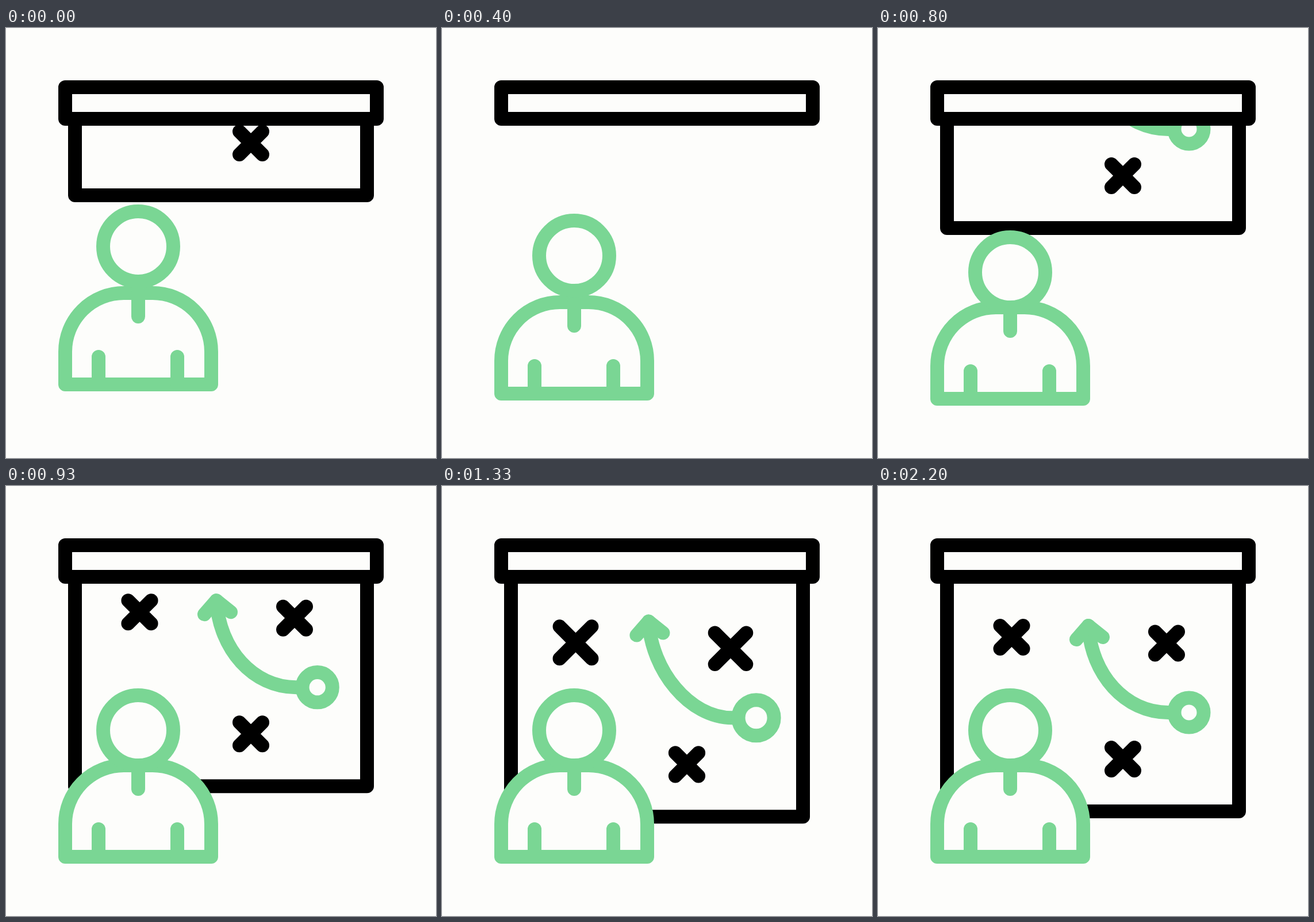
Recreate the animation shown at these times as an HTML page. Size 748 px wide and 748 px high, loop 2.27 s.

```html
<!DOCTYPE html>
<html lang="en">
<head>
<meta charset="utf-8">
<title>Strategy board</title>
<style>
  html, body { margin: 0; width: 100%; height: 100%; overflow: hidden; background: #fdfdfb; }
  svg { display: block; width: 100%; height: 100%; }
  .ink, .green { fill: none; stroke: #000; stroke-width: 24; stroke-linecap: round; stroke-linejoin: round; }
  .green { stroke: #7ad694; }
  .solid { fill: #fdfdfb; }
</style>
</head>
<body>
<svg viewBox="0 0 748 748">
  <clipPath id="below"><rect y="158" width="748" height="590"/></clipPath>
  <g clip-path="url(#below)">
    <g id="board">
      <path class="ink" d="M120 100V566H628V100"/>
      <path class="ink" id="x0"/>
      <path class="ink" id="x1"/>
      <path class="ink" id="x2"/>
      <path class="green" id="curve"/>
      <path class="green" id="tip" d="M345 267L366 243L391 263"/>
      <circle class="green solid" id="ring" cy="394"/>
    </g>
  </g>
  <rect class="ink solid" x="103" y="103" width="542" height="55"/>
  <g id="body">
    <path class="green solid" d="M103 645V588A102 102 0 0 1 205 486H255A102 102 0 0 1 357 588V645Z"/>
    <path class="green" d="M230 486V527M161 645V597M298 645V597"/>
  </g>
  <circle class="green solid" id="head" cx="230" cy="425" r="61"/>
</svg>
<script>
  const LOOP = 2270, FPS = 15;
  const el = id => document.getElementById(id);
  const set = (id, name, value) => el(id).setAttribute(name, value);
  const shift = (id, x, y) => set(id, 'transform', `translate(${x} ${y})`);
  const clamp = v => Math.min(1, Math.max(0, v));

  // Smooth 0 → 1 between two times
  const ease = (t, from, to) => (1 - Math.cos(Math.PI * clamp((t - from) / (to - from)))) / 2;

  // Smooth bump of height 1 around a peak time
  const bump = (t, peak, half) => {
    const d = (t - peak) / half;
    return Math.abs(d) < 1 ? Math.cos(d * Math.PI / 2) ** 2 : 0;
  };

  // Centre x, centre y, pulse height, peak time, half duration
  const crosses = [
    [232.5, 263, 8, 1310, 400],
    [502, 273.5, 7.6, 1390, 430],
    [426, 475, 7.2, 1700, 400]
  ];

  // Bottom edge of the sheet: rolls up, drops past its place, settles
  const sheetY = t => t < 500
    ? 158 + 133 * (1 - clamp(t / 230)) ** 2
    : 158 + 419 * ease(t, 587, 1040) - 11 * ease(t, 1040, 2180);

  function draw(t) {
    shift('board', 0, sheetY(t) - 566);
    shift('body', 0, -30 * bump(t, 119, 445));
    shift('head', 0, -52 * bump(t, 136, 570));

    crosses.forEach(([x, y, grow, peak, half], i) => {
      const a = 20 + grow * bump(t, peak, half), d = 2 * a;
      set('x' + i, 'd', `M${x - a} ${y - a}l${d} ${d}M${x - a} ${y + a}l${d} ${-d}`);
    });

    const r = 25.5 + 5.6 * bump(t, 1305, 475);
    set('ring', 'r', r);
    set('ring', 'cx', 515.5 + r);

    const pull = bump(t, 1540, 590);
    const dx = -9 * pull, dy = -23 * pull;
    shift('tip', dx, dy);
    set('curve', 'd', `M${366 + dx} ${243 + dy}C${371 + dx} ${328 + dy} 430 394 505 394`);
  }

  function tick(now) {
    const frame = Math.floor((now % LOOP + 5) * FPS / 1000);
    draw(frame % 34 * 1000 / FPS);
    requestAnimationFrame(tick);
  }
  draw(0);
  requestAnimationFrame(tick);
</script>
</body>
</html>
```
